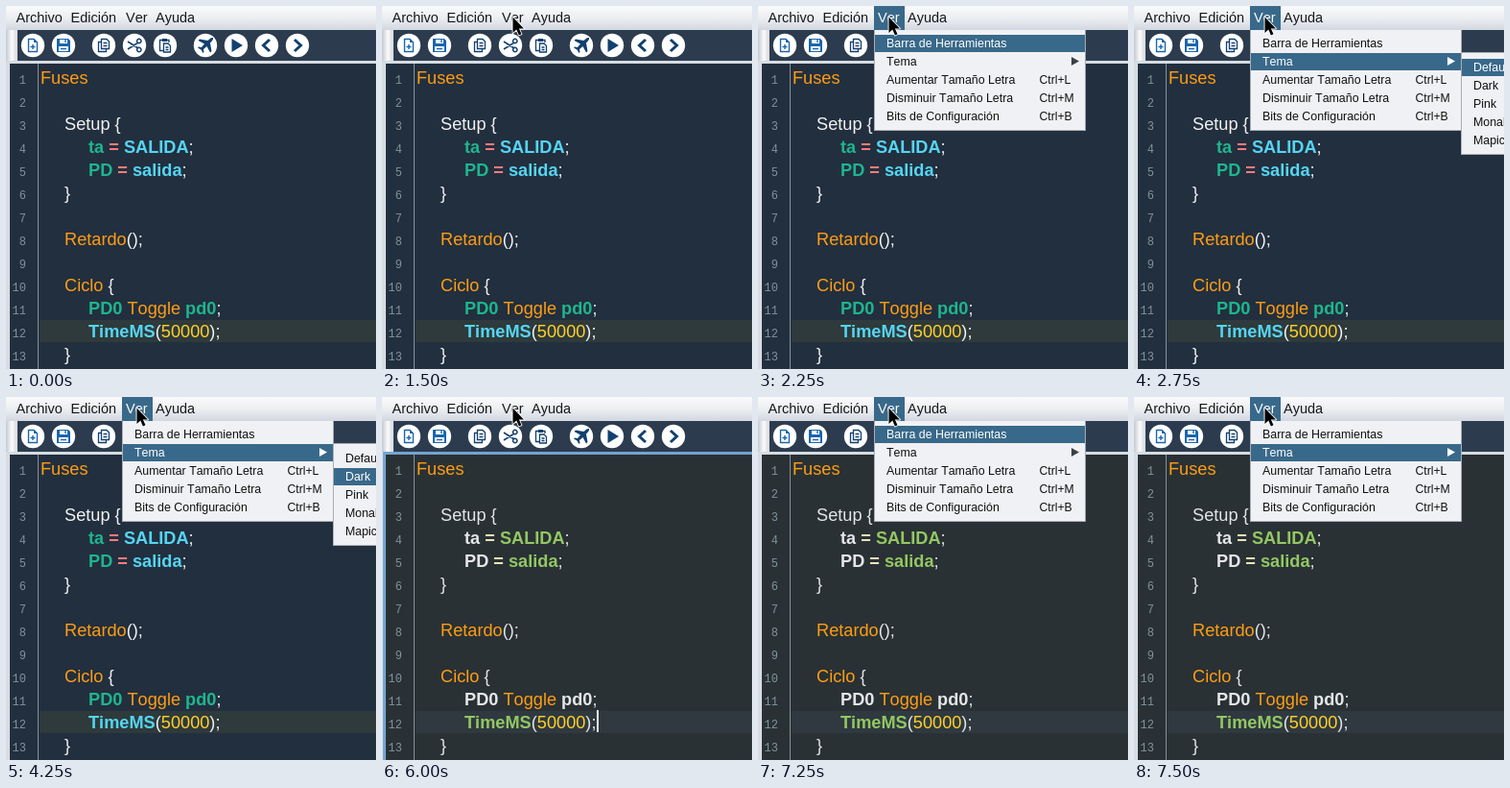
An HTML page with a canvas for the animation above (8 s loop, 386 px wide and 378 px high).

```html
<!DOCTYPE html>
<html lang="es">
<head>
<meta charset="utf-8">
<style>
html, body { margin: 0; width: 100%; height: 100%; overflow: hidden; background: #d6d9df; }
canvas { display: block; }
</style>
</head>
<body>
<canvas id="stage" width="386" height="378"></canvas>
<script>
const ctx = document.getElementById('stage').getContext('2d');
const LOOP = 8000;
const SANS = '"Liberation Sans", Arial, sans-serif';
const MONO = '"Liberation Mono", monospace';
const SELECT = '#39698a', PANEL = '#f0f1f4';

const ORANGE = '#ff9d14', YELLOW = '#ffd02a';
const THEMES = {
  dark: { back: '#222f3e', line: '#2e3a3b', text: '#f2f2f2', port: '#1fb58f', op: '#ff7b7b', key: '#55d5f3' },
  olive: { back: '#293134', line: '#2f393f', text: '#e4e6e8', port: '#e4e6e8', op: '#e8e2b7', key: '#93c763' }
};

// Each line: indent, then [text, style] runs.
const CODE = [
  [0, ['Fuses', 'call']],
  [0],
  [1, ['Setup {', 'text']],
  [2, ['ta', 'port'], [' = ', 'op'], ['SALIDA', 'key'], [';', 'text']],
  [2, ['PD', 'port'], [' = ', 'op'], ['salida', 'key'], [';', 'text']],
  [1, ['}', 'text']],
  [0],
  [1, ['Retardo', 'call'], ['();', 'text']],
  [0],
  [1, ['Ciclo', 'call'], [' {', 'text']],
  [2, ['PD0', 'port'], [' Toggle ', 'call'], ['pd0', 'port'], [';', 'text']],
  [2, ['TimeMS', 'key'], ['(', 'text'], ['50000', 'num'], [');', 'text']],
  [1, ['}', 'text']]
];
const BOLD = ['port', 'key', 'op'];

const MENU = [['Archivo', 10.5], ['Edición', 67.5], ['Ver', 125], ['Ayuda', 156]];
const VIEW_ITEMS = [
  ['Barra de Herramientas'], ['Tema'], ['Aumentar Tamaño Letra', 'Ctrl+L'],
  ['Disminuir Tamaño Letra', 'Ctrl+M'], ['Bits de Configuración', 'Ctrl+B']
];
const THEME_ITEMS = ['Default', 'Dark', 'Pink', 'Monal', 'Mapic'];

// Toolbar icons around their own centre: x, colour, filled path, stroked path, stroke width.
const BLUE = '#1c66ad', NAVY = '#12406f';
const ICONS = [
  [28, BLUE, 'M1-7L5-3H1Z', 'M-4.5-6.5H1L4.5-3V6.5H-4.5ZM-2.5 1.5H2.5M0-1V4', 1.4],
  [60, BLUE, 'M-7-7H5L7-5V7H-7ZM-4-6V-2H4V-6ZM-5 1V6H5V1Z', 'M2-6V-3M-3 3.5H3', 1.4],
  [102, NAVY, '', 'M-2.5-6.5H3L5.5-4V3.5H-2.5ZM-3-3.5H-5.5V6.5H2.5V4M-.5-2.5H3.5M-.5 .5H3.5', 1.3],
  [134, NAVY, '', 'M-7-4L4 3M-7 4L4-3M7-4.5A2.2 2.2 0 1 1 2.6-4.5A2.2 2.2 0 1 1 7-4.5M7 4.5A2.2 2.2 0 1 1 2.6 4.5A2.2 2.2 0 1 1 7 4.5', 1.5],
  [166, NAVY, 'M-3-7H2V-4H-3Z', 'M-2-5.5H-5.5V5.5H-2M1-5.5H4V-3M-1.5-2H3L5.5 .5V7H-1.5ZM.5 2H3.5M.5 4.5H3.5', 1.3],
  [208, NAVY, 'M8-8C6-8.5 4.5-7 2.5-5L-6-6.5L-7.5-5L-1-1.5L-4 2L-7 1.5L-8 2.5L-4.5 4.5L-2.5 8L-1.5 7L-2 4L1.5 1L5 7.5L6.5 6L5-2.5C7-4.5 8.5-6 8-8Z', '', 1],
  [240, NAVY, 'M-4.5-7L7 0L-4.5 7Z', '', 1],
  [272, NAVY, '', 'M3-6L-3.5 0L3 6', 3],
  [304, NAVY, '', 'M-3-6L3.5 0L-3 6', 3]
].map(([x, color, fill, stroke, width]) =>
  ({ x, color, fill: new Path2D(fill), stroke: new Path2D(stroke), width }));

const POINTER = new Path2D('M0 0V16.5L3.8 13L6.4 19L9 17.8L6.4 12H11.5Z');

function rect(x, y, w, h, color) {
  ctx.fillStyle = color;
  ctx.fillRect(x, y, w, h);
}

function text(string, x, y, size, color, { family = SANS, weight = '', align = 'left' } = {}) {
  ctx.font = `${weight} ${size}px ${family}`;
  ctx.textAlign = align;
  ctx.fillStyle = color;
  ctx.fillText(string, x, y);
  return ctx.measureText(string).width;
}

function gradient(x1, y1, ...colors) {
  const g = ctx.createLinearGradient(0, 0, x1, y1);
  colors.forEach((c, i) => g.addColorStop(i / (colors.length - 1), c));
  return g;
}

function drawMenuBar(open) {
  rect(0, 0, 386, 25, gradient(0, 25, '#fafafb', '#eceef1', '#d3d7e0'));
  if (open) rect(121, 0, 32, 25, SELECT);
  for (const [label, x] of MENU)
    text(label, x, 17, 14.5, open && label === 'Ver' ? '#fff' : '#16181c');
}

function drawToolbar() {
  rect(0, 25, 386, 32, '#2c3c4e');
  rect(0, 25, 12, 32, gradient(12, 0, '#c4c8ce', '#fbfbfc', '#d2d6dc'));
  for (const icon of ICONS) {
    ctx.save();
    ctx.translate(icon.x, 41);
    ctx.fillStyle = '#fff';
    ctx.beginPath();
    ctx.arc(0, 0, 12.2, 0, 7);
    ctx.fill();
    ctx.fillStyle = ctx.strokeStyle = icon.color;
    ctx.lineWidth = icon.width;
    ctx.fill(icon.fill, 'evenodd');
    ctx.stroke(icon.stroke);
    ctx.restore();
  }
}

function drawEditor(theme, focused, caret) {
  rect(0, 57, 386, 321, '#d6dce2');
  if (focused) rect(1, 57, 385, 321, '#73a4d1');
  rect(4, 60, 382, 318, theme.back);
  rect(35, 327, 351, 23, theme.line);
  rect(33, 60, 1, 318, '#87929a');
  CODE.forEach(([indent, ...runs], i) => {
    const y = 81 + 24 * i;
    text(i + 1, 21, y, 12, '#81929c', { family: MONO, align: 'right' });
    let x = 36 + 25 * indent;
    for (const [string, style] of runs) {
      const color = style === 'call' ? ORANGE : style === 'num' ? YELLOW : theme[style];
      x += text(string, x, y, 18.2, color, { weight: BOLD.includes(style) ? 'bold' : '' });
    }
  });
  if (caret) rect(224, 326, 2, 23, '#e8eef4');
}

function drawPopup(selected) {
  rect(121, 25, 221, 105, '#a9adb5');
  rect(122, 25, 219, 104, PANEL);
  VIEW_ITEMS.forEach(([label, shortcut], i) => {
    const y = 30 + 19 * i, on = i === selected, color = on ? '#fff' : '#111';
    if (on) rect(122, y, 219, 18, SELECT);
    text(label, 134, y + 13, 12.4, color);
    if (shortcut) text(shortcut, 293.5, y + 13, 12.2, color);
    if (label === 'Tema') {
      ctx.fillStyle = on ? '#fff' : '#3c3f45';
      ctx.fill(new Path2D('M327 53L335 57.5L327 62Z'));
    }
  });
}

function drawSubmenu(selected) {
  rect(341, 48, 45, 107, '#a9adb5');
  rect(342, 49, 44, 105, PANEL);
  THEME_ITEMS.forEach((label, i) => {
    const y = 55 + 19 * i, on = i === selected;
    if (on) rect(342, y, 44, 18, SELECT);
    text(label, 354, y + 13, 12.4, on ? '#fff' : '#111');
  });
}

function drawPointer(t) {
  if (t < 1000) return;
  const [x, y] = t < 1250 ? [166, -7] : t < 1500 ? [144, 4] : [136.5, 11.5];
  ctx.save();
  ctx.translate(x, y);
  ctx.lineJoin = 'round';
  ctx.lineWidth = 1.8;
  ctx.strokeStyle = '#fff';
  ctx.stroke(POINTER);
  ctx.fillStyle = '#000';
  ctx.fill(POINTER);
  ctx.restore();
}

function frame() {
  const t = performance.now() % LOOP;
  const changed = t >= 6000;
  const focused = changed && t < 6750;
  const open = t >= 1750 && !focused;
  const sinceOpen = t - (changed ? 6750 : 1750);
  const item = sinceOpen < 500 ? -1 : sinceOpen < 750 ? 0 : 1;

  ctx.fontKerning = 'none';
  drawEditor(changed ? THEMES.olive : THEMES.dark, focused, changed && t < 6500);
  drawToolbar();
  drawMenuBar(open);
  if (open) drawPopup(item);
  if (t >= 2750 && !changed) drawSubmenu(t < 4250 ? 0 : 1);
  drawPointer(t);
  requestAnimationFrame(frame);
}
requestAnimationFrame(frame);
</script>
</body>
</html>
```
